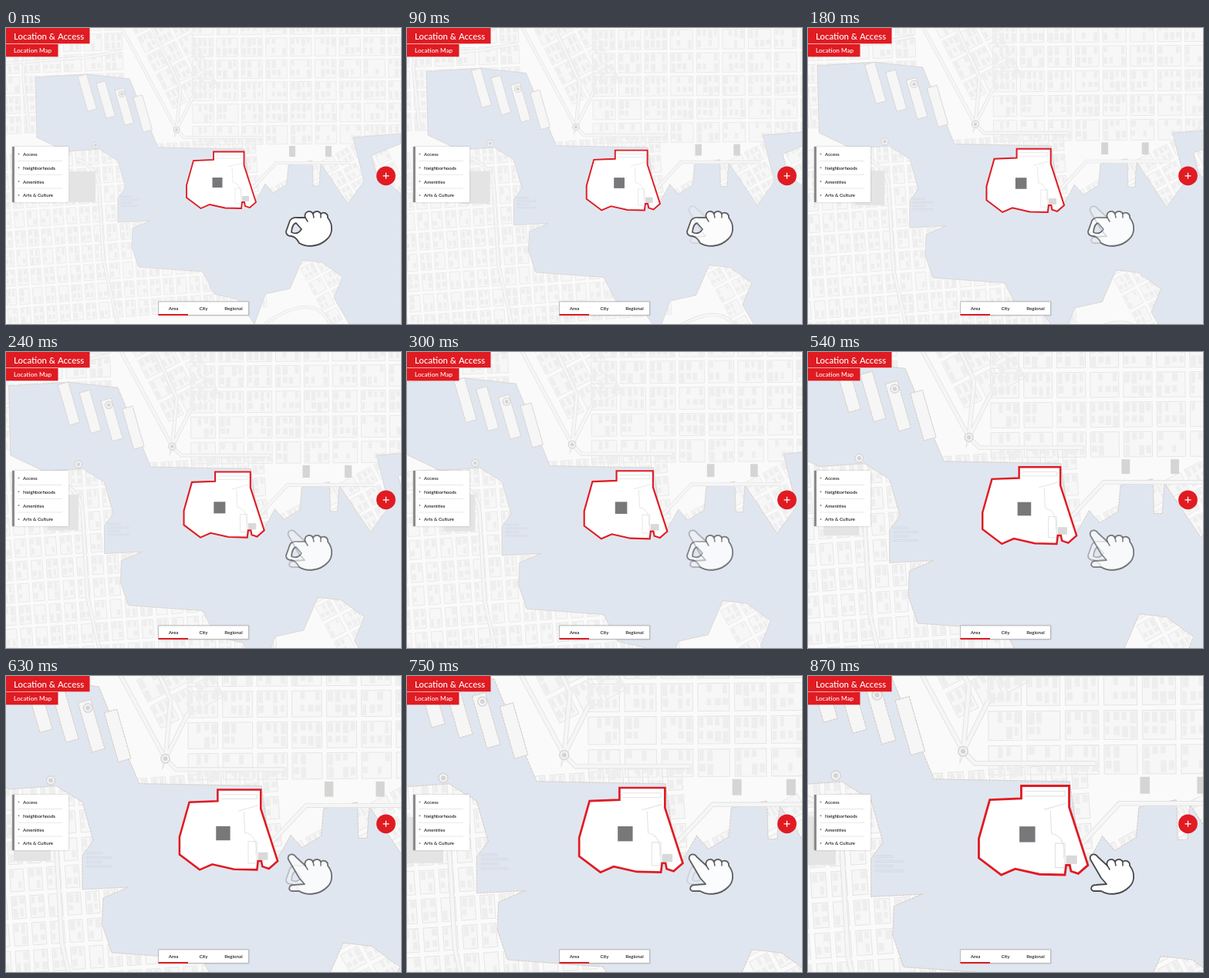
These frames come from a looping animation (512x384 px, 900 ms). An HTML page with a canvas:

```html
<!DOCTYPE html>
<html lang="en">
<head>
<meta charset="utf-8">
<title>Location map</title>
<style>
html, body { margin: 0; width: 100%; height: 100%; overflow: hidden; }
canvas { display: block; width: 512px; height: 384px; }
</style>
</head>
<body>
<canvas id="stage" width="512" height="384"></canvas>
<script>
const ctx = document.getElementById('stage').getContext('2d');
const LOOP = 900, STEP = 30, FADE = 870, ZOOM_PER_MS = .000657;
const RED = '#e01b22', INK = '#111', LAND = '#fafafa', WATER = '#e0e6f0';

let seed = 7;
const rand = () => (seed = seed * 16807 % 2147483647) / 2147483647;

const water = new Path2D(`M38 64 105 60 160 66 197 155 309 157 318 222 324 224 336 202 346 214 364 203
  366 178 397 172 398 205 406 205 408 176 443 228 464 199 450 142 512 137V150L474 165 480 190 512 215
  V384H445L425 350 436 323 410 304 384 301 368 338 336 345 322 384 300 352 270 345 255 316 172 310
  163 284 164 260 187 250 145 252V221L155 207 145 172 121 157 78 160 40 142Z`);
const site = new Path2D(`M269 160.5H308.5V178L324 226 316 233 310 231 309 226H306L305 234 284 233.5
  264 229 252.5 234 234 220V204L243 172 269 171Z`);
const siteLines = new Path2D('M272 165H305V169H272M288 180 306 175M293 181 294 200Q306 202 304 220M297 208H305V228H297Z');
const highways = new Path2D(`M150 0 221 132M190 0 226 78 221 132 242 90M0 46 105 38 150 30M28 0 22 60 30 135
  M221 132 231 142H330M92 170Q121 182 121 210L126 300 145 384M306 222 350 175H447M335 384Q400 340 420 384`);

// City blocks on rotated grids, each block split into random buildings.
const blocks = new Path2D(), buildings = new Path2D();
function city(x, y, cols, rows, w, h, angle) {
  const frame = new DOMMatrix().translate(x, y).rotate(angle);
  const grid = new Path2D(), houses = new Path2D();
  const bw = w - 4.5, bh = h - 4.5, lots = Math.round(bw / 7), lw = bw / lots, lh = bh / 2;
  for (let i = 0; i < cols; i++) for (let j = 0; j < rows; j++) {
    grid.rect(i * w, j * h, bw, bh);
    for (let k = 0; k < lots * 2; k++) {
      if (rand() < .25) continue;
      houses.rect(i * w + (k >> 1) * lw + 1, j * h + k % 2 * lh + 1,
        (lw - 1.4) * (.6 + rand() * .4), (lh - 1.5) * (.55 + rand() * .45));
    }
  }
  blocks.addPath(grid, frame);
  buildings.addPath(houses, frame);
}
city(241, -15, 9, 6, 31.8, 28.5, -.4);
city(-8, -14, 6, 6, 27, 26, -2);
city(158, -12, 3, 5, 23, 27, -27);
city(-12, 165, 20, 9, 17, 25, -4);
city(330, 215, 8, 9, 22, 22, -28);

// Four slanted piers across the old harbour, and slips on the west shore.
const piers = new Path2D(), docks = new Path2D();
for (let i = 0; i < 4; i++) {
  const pier = new Path2D();
  pier.rect(0, 0, 12, 47);
  piers.addPath(pier, new DOMMatrix().translate(93 + i * 24, 63 + i * 9).rotate(-16));
  docks.rect(149, 218 + i * 4, 14 + i % 2 * 9, 1.5);
}

const fill = (path, color) => { ctx.fillStyle = color; ctx.fill(path); };
const stroke = (path, color, width) => {
  ctx.strokeStyle = color; ctx.lineWidth = width; ctx.stroke(path);
};
const box = (x, y, w, h, color) => { ctx.fillStyle = color; ctx.fillRect(x, y, w, h); };
const disc = (x, y, r) => { const p = new Path2D(); p.arc(x, y, r, 0, 7); return p; };
function text(string, x, y, size, color = INK, align = 'left') {
  ctx.font = `500 ${size}px Lato, sans-serif`;
  ctx.textAlign = align;
  ctx.fillStyle = color;
  ctx.fillText(string, x, y);
}

function shoreline(path) {
  stroke(path, '#d9dadd', .6);
  ctx.setLineDash([1.6, 1.3]);
  stroke(path, '#dccdbf', .7);
  ctx.setLineDash([]);
}

function drawMap(scale) {
  ctx.save();
  ctx.translate(256, 192);
  ctx.scale(scale, scale);
  ctx.translate(-256, -192);
  ctx.lineJoin = 'miter';
  fill(blocks, '#f7f7f7');
  stroke(blocks, '#e6e6e6', .7);
  fill(buildings, '#eeeeee');
  fill(water, WATER);
  shoreline(water);
  stroke(docks, '#d0d6e1', .5);
  fill(piers, '#f6f6f6');
  shoreline(piers);
  stroke(highways, '#e2e2e2', 4.2);
  stroke(highways, '#f6f6f6', 3);
  box(82, 186, 34, 40, '#e4e4e4');
  for (const x of [367, 414]) box(x, 153, 8, 14, '#d6d5d4');
  for (const [x, y] of [[221, 132], [150, 85.5], [116, 152]]) {
    fill(disc(x, y, 4), '#f4f4f4');
    stroke(disc(x, y, 4), '#d5d5d5', 1);
    fill(disc(x, y, 2), '#d4d4d4');
  }
  fill(site, '#fff');
  stroke(siteLines, '#e2e2e2', .7);
  box(306, 218, 9, 7, '#d9d9d9');
  stroke(site, RED, 1.8);
  box(267.5, 194, 13, 13, '#77787a');
  ctx.restore();
}

// Both poses share the knuckles and the back of the hand.
const palm = `L388 246a5.5 5.5 0 0 1 10-5a5.5 5.5 0 0 1 10 0a5.5 5.5 0 0 1 9 5
  C425 256 423 268 416 274C406 284 390 285 380 279`;
const openHand = new Path2D(`M366 238C364 231 372 229 376 235${palm}H370C365 277 367 271 373 271L387 270 380 262Z`);
const closedHand = new Path2D(`M363 264L368 250Q371 245 378 246${palm}
  Q376 271 370 270Q363 270 363 264ZM370 265Q371 254 376 253L383 261Q378 269 370 265Z`);
const knuckles = new Path2D('M388 246l3 5M398 241l1 5M408 241v5');

function drawHand(shape, alpha) {
  ctx.globalAlpha = alpha;
  ctx.lineJoin = ctx.lineCap = 'round';
  ctx.fillStyle = '#fff';
  ctx.fill(shape, 'evenodd');
  stroke(shape, '#48484a', 1.8);
  stroke(knuckles, '#48484a', 1.5);
  ctx.globalAlpha = 1;
  ctx.lineCap = 'butt';
}

function panel(x, y, w, h) {
  ctx.shadowColor = 'rgba(0,0,0,.25)';
  ctx.shadowBlur = 2;
  box(x, y, w, h, '#fff');
  ctx.shadowColor = 'transparent';
}

function drawInterface() {
  box(0, 0, 108.5, 20.3, RED);
  box(0, 21, 67.5, 16.3, RED);
  text('Location & Access', 10, 14.6, 11.4, '#fff');
  text('Location Map', 10, 32.4, 8.2, '#fff');

  panel(8, 154, 73, 72);
  box(8, 154, 3, 72, '#8b8b8b');
  ['Access', 'Neighborhoods', 'Amenities', 'Arts & Culture'].forEach((label, i) => {
    const y = 163.5 + i * 17.8;
    if (i) box(15, y - 9.3, 58, .7, '#dedede');
    fill(disc(16.5, y, 1), '#888');
    text(label, 22, y + 2.5, 6.2);
  });

  panel(197.5, 355, 117, 17.5);
  ctx.strokeStyle = '#aaa';
  ctx.lineWidth = .7;
  ctx.strokeRect(197.5, 355, 117, 17.5);
  box(197.5, 371, 38.5, 2, RED);
  ['Area', 'City', 'Regional'].forEach((label, i) =>
    text(label, 217 + i * 39, 366.4, 6.2, INK, 'center'));

  fill(disc(492.5, 191.8, 12.4), RED);
  stroke(new Path2D('M488.5 191.8h8m-4-4v8'), '#fff', 1.2);
}

function draw(now) {
  const t = Math.floor(now % LOOP / STEP) * STEP;
  const opened = t / FADE;
  box(0, 0, 512, 384, LAND);
  drawMap(1 + t * ZOOM_PER_MS);
  drawHand(closedHand, 1 - opened);
  drawHand(openHand, opened);
  drawInterface();
  requestAnimationFrame(draw);
}
requestAnimationFrame(draw);
</script>
</body>
</html>
```
